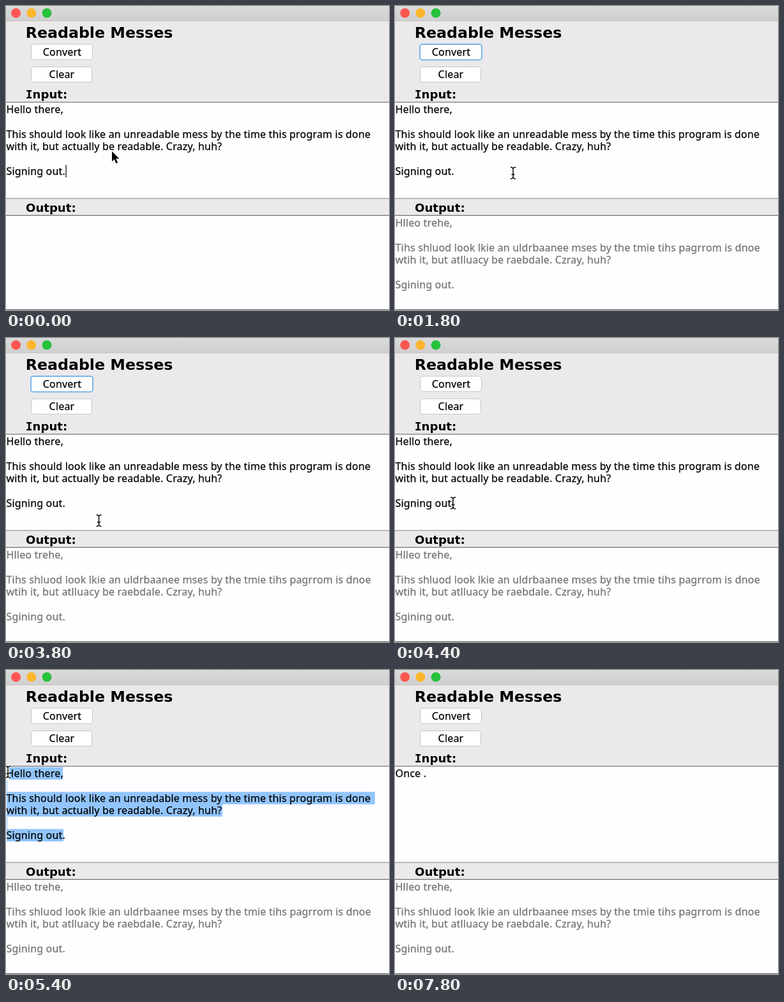
Animation, 600 px wide and 477 px high, one loop 8000 ms. Source, as an HTML page:

```html
<!DOCTYPE html>
<html lang="en">
<head>
<meta charset="utf-8">
<title>Readable Messes</title>
<style>
html, body { margin: 0; width: 100%; height: 100%; overflow: hidden; background: #ebe9ec; }
svg { display: block; width: 600px; height: 477px; }
text { white-space: pre; }
.body { font: 16px "Noto Sans", "Open Sans", sans-serif; letter-spacing: .182px; stroke: #000; stroke-width: .25px; }
.mid { text-anchor: middle; }
.head { font: bold 18.1px "DejaVu Sans", sans-serif; }
.title { font-size: 23.7px; }
.serif { font-family: "DejaVu Sans Mono", monospace; }
.area { fill: #fefdff; }
.line { fill: #5c5b5c; }
.button { fill: #fff; stroke: #c6c4c6; }
#output { fill: #737373; stroke: #737373; }
</style>
</head>
<body>
<svg viewBox="0 0 600 477">
  <defs>
    <linearGradient id="bar" x2="0" y2="1">
      <stop stop-color="#dbdadb"/><stop offset="1" stop-color="#d0cfd0"/>
    </linearGradient>
  </defs>
  <rect width="600" height="477" fill="#ebe9ec"/>
  <rect width="600" height="23.5" fill="url(#bar)"/>
  <rect y="23" width="600" height="1" fill="#c6c5c6"/>
  <circle cx="15.6" cy="11" r="7.5" fill="#fc5650"/>
  <circle cx="39.8" cy="11" r="7.5" fill="#fdb52d"/>
  <circle cx="64" cy="11" r="7.5" fill="#27c13b"/>

  <text class="head title" x="30.7" y="49.5">Readable Messes</text>
  <rect class="button" x="39.5" y="60" width="96" height="24" rx="4"/>
  <rect id="ring" x="39" y="60" width="97" height="24.5" rx="4" fill="#fff" stroke="#7ab6e8" stroke-width="2"/>
  <text class="body mid" x="88" y="78">Convert</text>
  <rect class="button" x="39.5" y="95.5" width="95" height="24" rx="4"/>
  <text class="body mid" x="87.5" y="113">Clear</text>

  <text class="head" x="30.7" y="145"><tspan class="serif">I</tspan>nput:</text>
  <rect class="area" y="151" width="600" height="151"/>
  <rect class="line" y="150.5" width="600" height="1"/>
  <rect class="line" y="301.5" width="600" height="1" opacity=".75"/>
  <text class="head" x="31" y="323">Output:</text>
  <rect class="area" y="329" width="600" height="148"/>
  <rect class="line" y="328" width="600" height="1"/>
  <rect class="line" y="476" width="600" height="1"/>

  <path id="selection" fill="#92c5fd"/>
  <g id="input" class="body"></g>
  <text id="typed" class="body" x=".5" y="168"></text>
  <g id="output" class="body"></g>
  <rect id="caret" width="1.2" height="19.5"/>
  <path id="arrow" d="M0 0V16l3.7-3.5 2.8 6.4 2.6-1.1-2.8-6.3h5z" stroke="#fff" stroke-width="1.6" paint-order="stroke"/>
  <g id="beam" fill="none">
    <path stroke="#fff" stroke-width="3" d="M-4-9q4 0 4 3 0-3 4-3M-4 9q4 0 4-3 0 3 4 3M0-6V6M-2.5 2.5H2.5"/>
    <path stroke="#000" stroke-width="1.4" d="M-4-9q4 0 4 3 0-3 4-3M-4 9q4 0 4-3 0 3 4 3M0-6V6M-2.5 2.5H2.5"/>
  </g>
</svg>
<script>
const LOOP = 8000, STEP = 100, PITCH = 19.4, TOP = 152.5;
const CLICK = 600, REFOCUS = 4200, DRAG = 4700, ERASE = 5500;
const $ = id => document.getElementById(id);
const [ring, selection, input, typed, output, caret, arrow, beam] =
  ["ring", "selection", "input", "typed", "output", "caret", "arrow", "beam"].map($);

// time, x, y of the pointer
const path = [
  [0, 166, 228], [300, 133, 130], [500, 115, 70], [900, 115, 70],
  [1300, 184, 150], [1500, 198, 215], [1800, 185, 262], [2100, 180, 274],
  [2200, 180, 274], [2600, 217, 370], [2900, 205, 420], [3100, 188, 418],
  [3200, 184, 414], [3500, 166, 335], [3800, 145.5, 286.5], [4000, 115, 266],
  [4200, 91, 259], [4600, 91, 259], [4700, 78, 228], [4800, 55, 192],
  [5000, 20, 170], [5200, 3, 160], [8000, 3, 160]
];
// time, number of characters typed
const keys = [[ERASE, 0], [6600, 1], [6800, 2], [7000, 3], [7200, 4], [7300, 5]];
const rowEnds = [89, 2, 578, 339, 2, 90];

function fill(group, lines, y) {
  lines.forEach((line, i) => {
    const row = document.createElementNS("http://www.w3.org/2000/svg", "text");
    row.setAttribute("x", .5);
    row.setAttribute("y", y + i * PITCH);
    row.textContent = line;
    group.append(row);
  });
}

fill(input, ["Hello there,", "",
  "This should look like an unreadable mess by the time this program is done",
  "with it, but actually be readable. Crazy, huh?", "", "Signing out."], 168);
fill(output, ["Hlleo trehe,", "",
  "Tihs shluod look lkie an uldrbaanee mses by the tmie tihs pagrrom is dnoe",
  "wtih it, but atlluacy be raebdale. Czray, huh?", "", "Sgining out."], 346);

const show = (node, on) => node.setAttribute("visibility", on ? "visible" : "hidden");

function pointer(t) {
  const i = path.findIndex(p => p[0] > t);
  const [t0, x0, y0] = path[i - 1], [t1, x1, y1] = path[i];
  const k = (t - t0) / (t1 - t0);
  return [x0 + (x1 - x0) * k, y0 + (y1 - y0) * k];
}

function selected(x, y) {
  const first = Math.max(0, Math.floor((y - TOP) / PITCH));
  return rowEnds.map((end, row) => {
    const left = row === first ? Math.max(1, x + 2) : 1;
    return row < first || left >= end ? "" : `M${left} ${TOP + row * PITCH}H${end}v${PITCH}H${left}z`;
  }).join("");
}

function placeCaret(t) {
  let x = 93.5, row = 5, since = 0;
  if (t >= ERASE) {
    const [time, count] = keys.filter(k => k[0] <= t).pop();
    x = 1 + (count ? typed.getSubStringLength(0, count) : 0);
    row = 0;
    since = time;
  } else if (t >= REFOCUS) {
    x = 89.5;
    since = REFOCUS;
  }
  caret.setAttribute("x", x);
  caret.setAttribute("y", TOP + row * PITCH);
  const focused = t < CLICK || t >= REFOCUS && t < DRAG || t >= ERASE;
  show(caret, focused && (t - since) % 1000 < 500);
}

function draw(time) {
  const t = Math.floor(time % LOOP / STEP) * STEP;
  const [x, y] = pointer(t);
  const erased = t >= ERASE, dragging = t >= DRAG && !erased;
  const inText = t > 1000 && y > 151 && y < 302;

  show(ring, t >= CLICK && t < REFOCUS);
  show(output, t >= CLICK);
  show(input, !erased);
  show(selection, dragging);
  if (dragging) selection.setAttribute("d", selected(x, y));

  const count = keys.filter(k => k[0] <= t).length - 1;
  typed.textContent = erased ? "Once ".slice(0, count) + "." : "";
  placeCaret(t);

  for (const node of [arrow, beam]) node.setAttribute("transform", `translate(${x} ${y})`);
  show(arrow, !inText && !erased);
  show(beam, inText && !erased);
}

let start;
function tick(now) {
  start ??= now;
  draw(now - start);
  requestAnimationFrame(tick);
}
draw(0);
requestAnimationFrame(tick);
</script>
</body>
</html>
```
